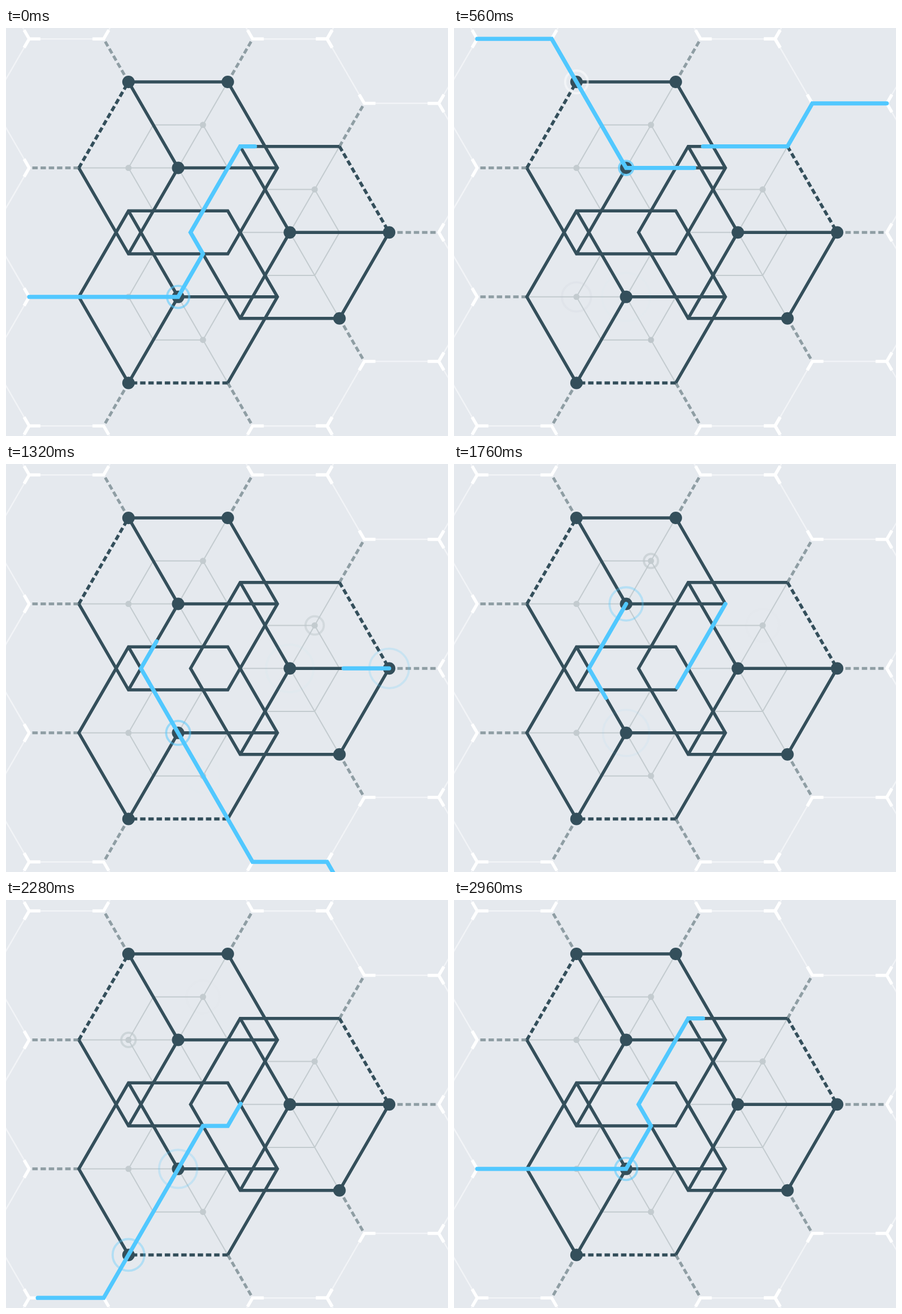
Recreate the animation shown at these times as an HTML page. Size 779 px wide and 719 px high, loop 3 s.

```html
<!DOCTYPE html>
<html lang="en">
<head>
<meta charset="utf-8">
<title>Hexagon network</title>
<style>
  html, body { margin: 0; width: 100%; height: 100%; overflow: hidden; background: #e5e9ee; }
  svg { display: block; width: 779px; height: 719px; }
  path, .ring { fill: none; }
  .web { stroke: #f2f4f7; stroke-width: 2; }
  .arm { stroke: #fff; stroke-width: 5.5; }
  .link { stroke: #8f9ea4; stroke-width: 5; stroke-dasharray: 9.5 5; }
  .thin { stroke: #c3cbcf; stroke-width: 2; }
  .bold { stroke: #344f5b; stroke-width: 5.5; }
  .dash { stroke: #344f5b; stroke-width: 5.5; stroke-dasharray: 9.5 5; }
  .dot { fill: #c3cbcf; }
  .node { fill: #344f5b; }
  .ring { stroke-width: 3.8; }
  .pulse { stroke: #51c8ff; stroke-width: 7.2; stroke-linecap: round; }
</style>
</head>
<body>
<svg id="stage" viewBox="0 0 779 719"></svg>
<script>
const stage = document.getElementById('stage');

function add(tag, attrs = {}, parent = stage) {
  const el = document.createElementNS('http://www.w3.org/2000/svg', tag);
  for (const k in attrs) el.setAttribute(k, attrs[k]);
  return parent.appendChild(el);
}
const line = (cls, ...points) => add('path', { class: cls, d: 'M' + points.join('L') });
const disc = (cls, [cx, cy], r, parent) => add('circle', { class: cls, cx, cy, r }, parent);

// Everything sits on a triangular lattice with this centre and unit.
// Directions count 60 degree turns clockwise from the right.
const CENTER = [369, 360.2], UNIT = 43.75;
const move = ([x, y], dir, units) => [
  x + units * UNIT * Math.cos(dir * Math.PI / 3),
  y + units * UNIT * Math.sin(dir * Math.PI / 3)
];
const lattice = (i, j) => move(move(CENTER, 0, i), 1, j);

// Three hexagons around the centre; dots and nodes are turns relative to k
const hexes = [
  { k: 2, dots: [1, -1], nodes: [0] },
  { k: 0, dots: [-1], nodes: [0, 1] },
  { k: 4, dots: [1, -1], nodes: [0, 1] }
];
for (const h of hexes) h.c = move(CENTER, h.k, 3);

// Outer web: every link ends in a fork, whose branches end in full junctions
const junctions = [];
for (const { c, k } of hexes)
  for (const d of [k - 1, k, k + 1]) {
    const p = move(c, d, 6);
    line('link', move(c, d, 4), p);
    junctions.push({ p, dirs: [d - 1, d + 1] });
    for (const e of [d - 1, d + 1])
      junctions.push({ p: move(p, e, 3), dirs: [e - 1, e + 1, e + 3] });
  }
for (const { p, dirs } of junctions)
  for (const d of dirs) line('web', p, move(p, d, 3));
for (const { p, dirs } of junctions) {
  const [a, b, e] = dirs.map(d => move(p, d, d % 3 ? 0.41 : 0.45));
  line('arm', a, p, b);
  if (e) line('arm', p, e);
}

for (const { c, k } of hexes)
  for (let d = 0; d < 6; d++) {
    line('thin', move(c, d, 2), move(c, d + 1, 2));
    // The spoke facing the centre is cut short
    if (d % 2) line('thin', c, move(c, d, d === (k + 3) % 6 ? 2 : 4));
  }

const dots = hexes.flatMap(({ c, k, dots }) => dots.map(turn => move(c, k + turn, 2)));
for (const p of dots) disc('dot', p, 5.5);

for (const { c, k } of hexes) {
  for (const d of [0, 2, 4]) line('bold', c, move(c, d, 4));
  line('bold', ...[0, 1, 2, 3, 4, 5].map(i => move(c, k + i, 4)));
  line('dash', move(c, k - 1, 4), move(c, k, 4));
}

// The upper rim flashes white, all other nodes blue
const BLUE = '#51c8ff', GREY = '#bcc5c9', WHITE = '#fff';
const nodes = hexes.flatMap(({ c, k, nodes }) => [
  { p: c, color: BLUE },
  ...nodes.map(turn => ({ p: move(c, k + turn, 4), color: k === 4 ? WHITE : BLUE }))
]);
for (const { p } of nodes) disc('node', p, 11);

const LOOP = 3000, STEP = 40, CYCLE = LOOP - STEP;
const TRAVEL = 1000, LAG = 560, RING = 900;

// cubic-bezier(.5, 0, .5, 1)
function ease(x) {
  if (x <= 0) return 0;
  if (x >= 1) return 1;
  let lo = 0, hi = 1;
  for (let i = 0; i < 24; i++) {
    const u = (lo + hi) / 2;
    if (1.5 * u * (1 - u) + u ** 3 < x) lo = u; else hi = u;
  }
  return lo * lo * (3 - 2 * lo);
}

const ringLayer = add('g');
const rings = [];
function addRing(p, color, size, at) {
  const el = disc('ring', p, 0.1, ringLayer);
  el.setAttribute('stroke', color);
  rings.push({ el, size, at });
}
dots.forEach((p, i) => addRing(p, GREY, 30, i * 516));

// Start time, start point and a walk of direction-length pairs
const pulses = [
  [2400, lattice(-9, 3), '06 52 41 54 04 52 03'],
  [0, lattice(-3, -9), '03 16 03 13 04'],
  [560, lattice(0, 12), '43 33 49 53'],
  [1400, lattice(4, -3), '24 31 28 33']
].map(([at, start, walk]) => {
  const points = [start];
  for (const [dir, units] of walk.split(' ')) points.push(move(points.at(-1), +dir, +units));
  const el = line('pulse', ...points);
  return { el, at, len: el.getTotalLength() };
});

// Each node a pulse touches sends out a ring a little ahead of its arrival
for (const { el, at, len } of pulses) {
  const waiting = new Set(nodes);
  for (let ms = 0; ms <= TRAVEL; ms += 2) {
    const { x, y } = el.getPointAtLength(ease(ms / TRAVEL) * len);
    for (const node of waiting)
      if (Math.hypot(x - node.p[0], y - node.p[1]) < 4) {
        addRing(node.p, node.color, 43, at + ms * 0.86);
        waiting.delete(node);
      }
  }
}

const show = (el, on) => el.setAttribute('visibility', on ? 'visible' : 'hidden');

function draw(ms) {
  // The last step of the loop repeats the first one
  const t = Math.floor(ms % LOOP / STEP) * STEP % CYCLE;
  const age = at => (t - at + CYCLE) % CYCLE;

  for (const { el, size, at } of rings) {
    const a = age(at) / RING;
    show(el, a > 0 && a < 1);
    if (a >= 1) continue;
    const p = 1 - (1 - a) ** 2;
    el.setAttribute('r', Math.max(0.1, size * p));
    el.setAttribute('stroke-opacity', 1 - p);
  }
  for (const { el, at, len } of pulses) {
    const a = age(at);
    const head = ease(a / TRAVEL) * len, tail = ease((a - LAG) / TRAVEL) * len;
    show(el, head - tail > 0.01);
    el.setAttribute('stroke-dasharray', `${head - tail} ${len * 2}`);
    el.setAttribute('stroke-dashoffset', -tail);
  }
}

let origin;
function tick(now) {
  origin ??= now;
  draw(now - origin);
  requestAnimationFrame(tick);
}
draw(0);
requestAnimationFrame(tick);
</script>
</body>
</html>
```
